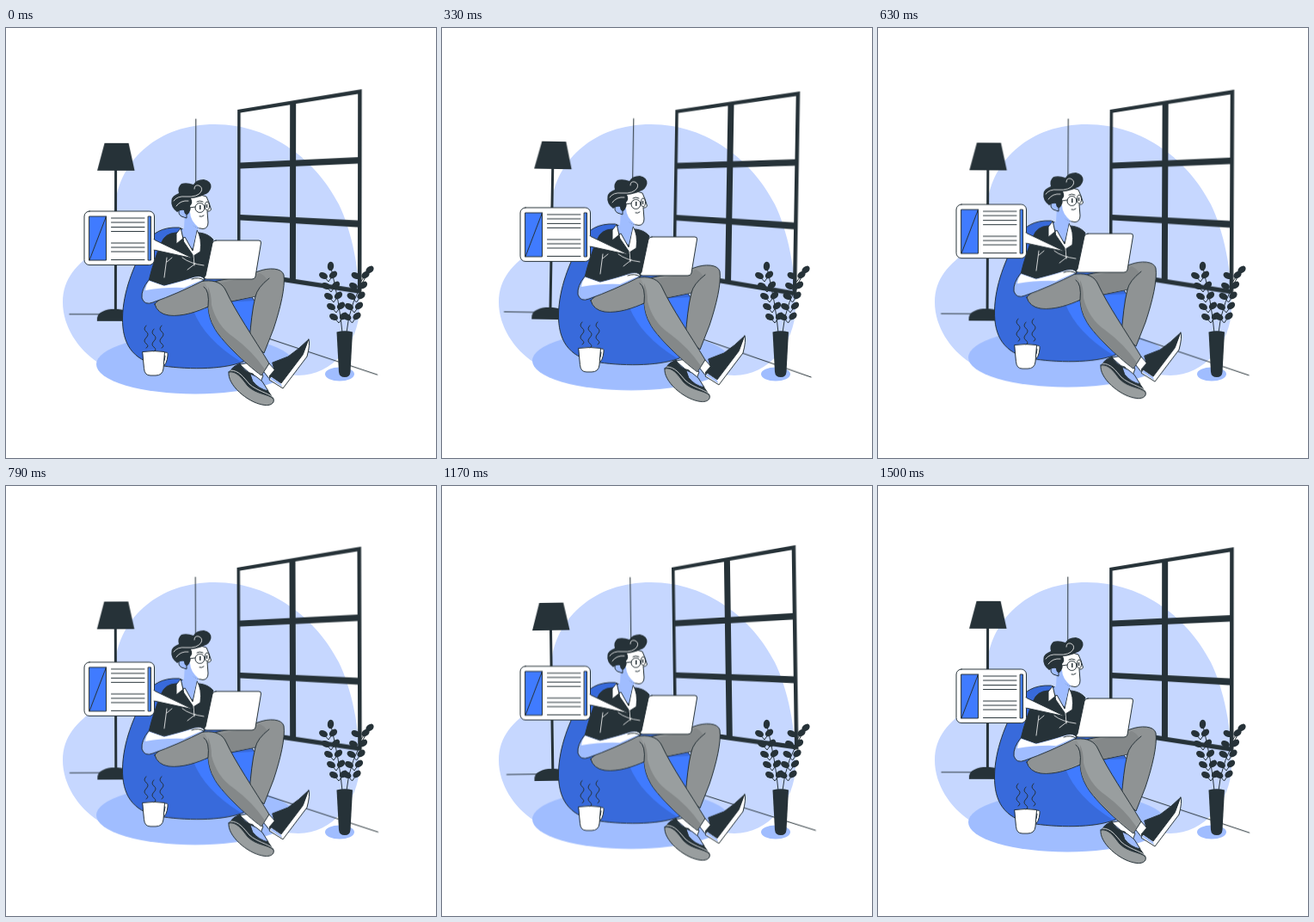
An HTML page for the animation above (1540 ms loop, 500 by 500 pixels).

```html
<!DOCTYPE html>
<html lang="en">
<head>
<meta charset="utf-8">
<title>Reading at home</title>
<style>
  html, body { margin: 0; width: 100%; height: 100%; overflow: hidden; background: #fff; }
  svg { display: block; width: 100%; height: 100%; }
  .dark { fill: #263238; }
  .blue { fill: #407bff; }
  .deep { fill: #386adb; }
  .pale { fill: #c6d7ff; }
  .soft { fill: #a0bdff; }
  .grey { fill: #999e9f; }
  .mid { fill: #8f9394; }
  .shade { fill: #848889; }
  .white { fill: #fff; }
  .line { stroke: #263238; stroke-width: 1; stroke-linejoin: round; stroke-linecap: round; }
  .none { fill: none; }
  .fold { fill: none; stroke: #fff; stroke-width: .8; stroke-linecap: round; }
  #room { transform-origin: 253px 237px; }
</style>
</head>
<body>
<svg viewBox="0 0 500 500">
  <path class="pale" d="M66 319C66 290 84 274 104 259C122 245 124 221 128 199C135 154 176 112 243 112C310 112 362 156 387 205C402 236 412 283 411 327C410 366 380 404 340 404C300 402 270 396 220 398C170 400 132 402 107 389C84 374 66 347 66 319Z"/>
  <g class="float"><ellipse class="soft" cx="220" cy="391" rx="115" ry="34.5"/></g>
  <ellipse class="soft" cx="388" cy="402.5" rx="17" ry="8"/>

  <g id="room">
    <path class="line none" d="M220.7 106V333M74 333H221L432 403"/>
    <path id="window" class="dark" fill-rule="evenodd"/>
    <path class="dark" d="M114.500 134H142.500L149.500 166H106ZM126 165H129V330H126ZM106 341Q105 333 112 330Q120 326 130 327Q147 328 149 341Z"/>
  </g>

  <g id="plant">
    <path class="dark" d="M384.500 353.500Q394 351 403 353.500L400.500 400Q400 406 394 406Q387.500 406 387 400Z"/>
  </g>

  <g class="float">
    <!-- bean bag -->
    <path class="deep line" d="M201 232C181 231 169 239 162 252C148 277 136 307 135.500 337C135 367 147 386 177 392C206 397 251 398 276 388C291 381 291 345 289 317L238 250Z"/>
    <path class="blue" d="M218 329Q231 362 273 388C290 383 290 350 289 317L234 320Z"/>

    <!-- far leg -->
    <path class="mid line" d="M228 299C245 292 273 291 293 283C306 278 321 279 323 287C325 301 319 326 311 350L300 378L283 362C285 344 286 328 290 312L257 319L232 325Z"/>
    <path class="shade" d="M234 300C259 293 278 292 295 285Q302 288 303 293Q291 304 289 312L257 318Z"/>
    <path class="line none" d="M306 291Q292 302 290 312"/>

    <!-- far shoe -->
    <path class="white line" d="M272 391L284 389L299 404L296 412Z"/>
    <path class="dark line" d="M260 399Q264 393 272 390Q276 400 287 402L299 414L311 431Q300 437 282 425Z"/>
    <path class="soft line" d="M284 402Q291 404 298 411L305 422Q294 420 287 411Z"/>
    <path class="grey line" d="M259 400C268 398 274 407 281 416C291 426 304 425 311 431C313 437 306 440 298 438C281 435 257 415 259 400Z"/>
    <path class="fold" d="M261 398C271 398 276 406 283 414C292 422 304 424 310 429"/>

    <!-- near leg -->
    <path class="white line" d="M298 397L306 390L313 398L306 407Z"/>
    <path class="grey line" d="M173 321C182 311 208 297 231 294C244 293 252 297 256 306C267 330 288 360 306 390L297 404C279 391 248 361 242 348Q236 338 235 324C224 329 206 336 189 334Q176 332 173 321Z"/>
    <path class="shade" d="M235 301Q239 309 239 322Q245 346 264 359Q286 375 301 397L297 403C279 390 248 360 242 347Q236 337 235 323Z"/>
    <path class="mid" d="M174 321C184 312 208 299 231 296Q237 305 235 322C224 328 206 335 189 333Q177 331 174 321Z"/>
    <path class="line none" d="M235 324Q237 305 230 301"/>

    <!-- near shoe -->
    <path class="dark line" d="M310 389L328 382Q341 373 352 362L350 380L321 418L306 405L312 398Z"/>
    <path class="white line" d="M352 362Q354 367 350 382L322 419L306 409L308 405L320 413L345 380Z"/>
    <path class="soft" d="M307 408L309 406L320 414L321 417Z"/>

    <!-- torso -->
    <path class="dark line" d="M197 238Q185 239 181 249Q172 269 166 294L184 300L232 292L241 246Q235 239 225 238Z"/>
    <path class="soft" d="M208 215L223 226V238L215 257L202 236L207 233Z"/>
    <path class="white line" d="M203 233L198 239V251L208 243L217 259L222 235Q228 244 226 260L218 265L207 249Z"/>
    <path class="soft" d="M208 222L222 234L217 257L208 241Z"/>
    <path class="fold" d="M187 267L184 290M193 267L187 272M205 267Q214 274 230 276M218 264L219 276M211 281L220 274"/>

    <!-- arm -->
    <path class="soft line" d="M166 293Q157 304 158 314Q161 323 171 319Q199 309 231 293Q229 287 219 289Q204 294 184 299Z"/>
    <path class="white" d="M166.500 294L184 300Q204 295 219 290Q228 288 230 292L207 302Q186 301 162 305Q163 298 166.500 294Z"/>
    <path class="line none" d="M216 292Q224 289 230 293"/>

    <!-- laptop -->
    <path class="white line" d="M244 247H294Q297 247 296.500 250L290 289Q289.500 292 286 292H233Q229 291 232 288L240 250Q241 247 244 247Z"/>

    <!-- head -->
    <path class="white line" d="M211 198Q221 191 233 196L236 203L238.500 211Q237 214 234 213L235 226Q235 233 229 233.500Q219 233 212 223L207 215Z"/>
    <path class="soft" d="M208 212L214 214Q214 224 225 233Q216 231 208 222Z"/>
    <path class="soft line" d="M202 210Q199 216 204 219L210 221V211Z"/>
    <path class="dark" d="M199 214Q191 208 192.500 200Q193 195 201 192Q199 185 204 181Q210 179 218 182Q221 176 230 176Q239 178 238.500 185Q237 192 230 194Q224 197 215 198Q218 203 214 207Q216 212 211 217Q207 217 207 212Q203 211 199 214Z"/>
    <path class="fold" d="M195 201Q199 195 209 196Q223 197 227 190Q229 185 224 183Q219 182 219 187M198 207Q203 200 212 201"/>
    <g class="line none">
      <circle cx="225.500" cy="209" r="5.500"/>
      <ellipse cx="234" cy="207" rx="2.500" ry="5"/>
      <path d="M220 208L213 209M231 207H232M222 202Q225 200 229 202M225 219Q228 220 230 218"/>
    </g>
    <path class="dark" d="M225 206h1.500v5h-1.500zM233 205h1.200v4h-1.200z"/>

    <!-- mug -->
    <path class="white line" d="M183 378Q189 375 188 381Q187 391 182 394V390Q185 387 185 381H183Z"/>
    <path class="white line" d="M159 376.500Q172 374.500 184.500 376.500L183 396Q182 404 174 404H168Q161 404 160.500 396Z"/>
    <path id="steam" class="line none"/>

    <!-- speech bubble -->
    <rect class="white line" x="91" y="213" width="81.500" height="62.500" rx="6"/>
    <path class="white line" d="M172 246L218 268L172 258"/>
    <path class="white" d="M170.500 246.500H173V257.500H170.500Z"/>
    <rect class="blue line" x="97" y="219" width="19.500" height="51"/>
    <path class="line none" d="M116.500 219L97 270"/>
    <rect class="blue line" x="165.500" y="219" width="3" height="51"/>
    <path id="text" class="line none"/>
  </g>
</svg>
<script>
  const $ = s => document.querySelector(s);
  const draw = (s, d) => $(s).setAttribute('d', d);
  const LOOP = 1540, CYCLE = 1500, FRAMES = 36, PHASE = 28;

  // panes: column spans crossed with rows that slant from the left edge to the right
  const [left, right] = [272.5, 409];
  const slant = (a, b, x) => a + (b - a) * (x - left) / (right - left);
  const rows = [[98.5, 76.5, 156.5, 150], [163.5, 157.5, 217, 223.5], [223.5, 231.5, 282, 303]];
  const pane = (x0, x1, [a, b, c, d]) =>
    `M${x0} ${slant(a, b, x0)}L${x1} ${slant(a, b, x1)}V${slant(c, d, x1)}L${x0} ${slant(c, d, x0)}Z`;
  draw('#window', 'M269 95L413.5 71V309L269 287Z' +
    rows.map(r => pane(left, 330, r) + pane(337, right, r)).join(''));

  // a sprig: curved stem, pairs of leaves, one at the tip
  const leaf = (x, y, tilt) =>
    `<ellipse class="dark" rx="5.200" ry="3.700" transform="translate(${x} ${y}) rotate(${tilt})"/>`;
  function sprig(x, lean, root, tipX, tipY, tilt) {
    let out = `<path class="line none" d="M${root} 354Q${root - lean} 320 ${tipX} ${tipY}"/>` + leaf(tipX, tipY, tilt);
    for (let k = 0; k < 5; k++) {
      const sx = x + lean * k, y = 288 + 12 * k;
      out += `<path class="line none" d="M${sx - 6} ${y}L${sx} ${y + 7}L${sx + 5.5} ${y - 1}"/>`;
      out += leaf(sx - 6, y, 25) + leaf(sx + 5.5, y - 1, -40);
    }
    return out;
  }
  $('#plant').insertAdjacentHTML('afterbegin',
    sprig(375, 3, 391, 377.5, 277, 95) + sprig(412.5, -2.5, 396, 423, 281, -40));

  const wave = (x, y) => `M${x} ${y}q-4 4 0 7t0 7t0 7t0 5`;
  draw('#steam', wave(163, 346) + wave(172, 350) + wave(181, 346));
  draw('#text', [221, 226, 231.5, 236.5, 250, 255, 260, 269.5].map(y => `M122.500 ${y}H161`).join(''));

  // triangle wave: 0 at whole turns, 1 halfway
  const tri = p => 1 - Math.abs(1 - 2 * (((p % 1) + 1) % 1));

  // each pose is held until the next one, on a 10 ms clock, switching just ahead of the tick
  function play(el, pose) {
    const steps = Array.from({ length: FRAMES + 1 }, (_, i) => {
      const ms = i * CYCLE / FRAMES;
      return {
        offset: Math.max(0, Math.round(ms / 10) * 10 - 4) / LOOP,
        transform: pose((ms + PHASE) / CYCLE),
        easing: 'steps(1, end)'
      };
    });
    el.animate([...steps, { ...steps[FRAMES], offset: 1 }], { duration: LOOP, iterations: Infinity });
  }
  const bob = p => `translateY(${0.4 - 9.5 * tri(p)}px)`;
  const sway = p => `rotate(${2 * tri(p + 0.25) - 1}deg)`;
  document.querySelectorAll('.float').forEach(el => play(el, bob));
  play($('#room'), sway);
</script>
</body>
</html>
```
